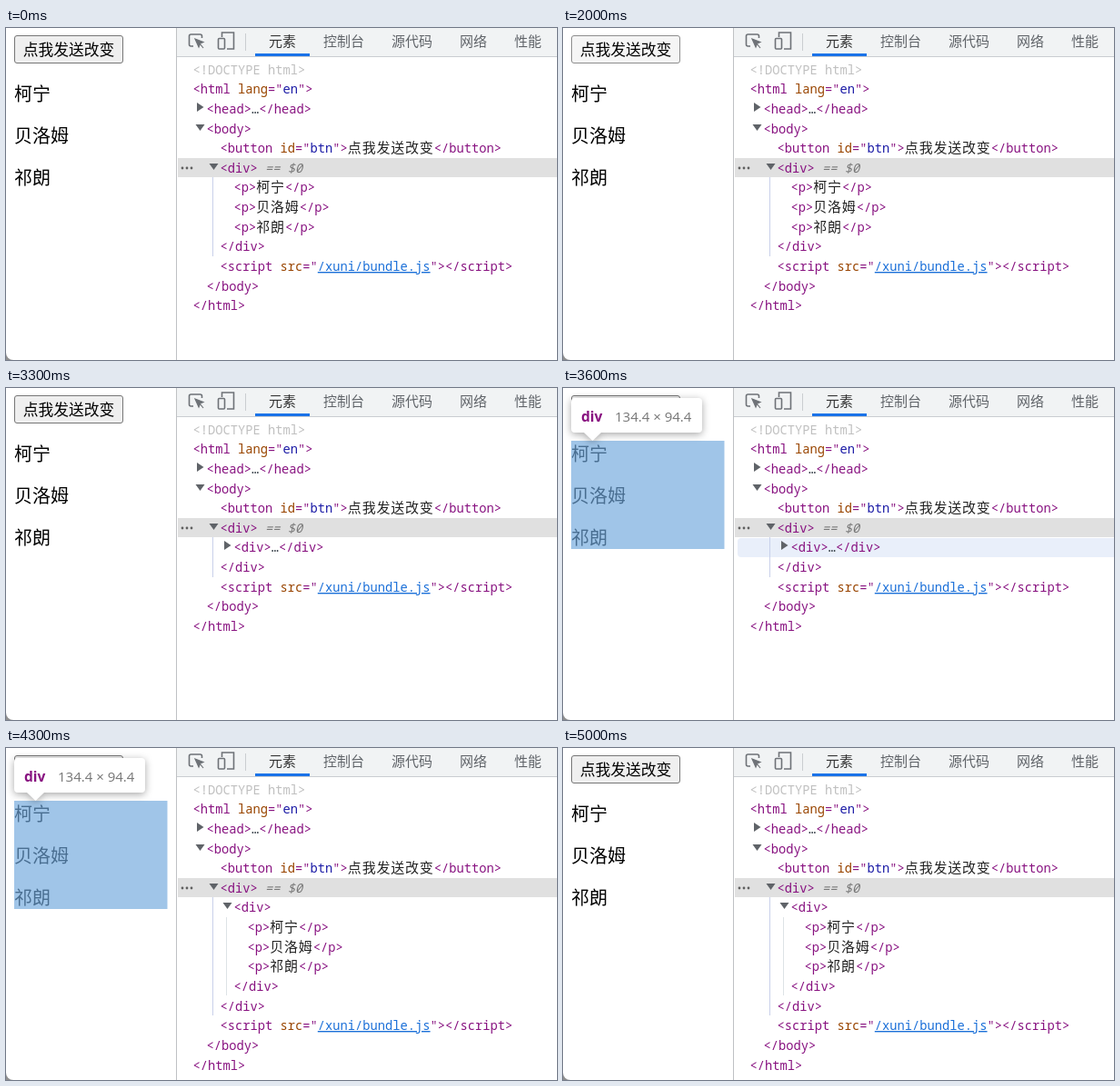
These frames come from a looping animation (606 by 365 pixels, 6300 ms). An HTML page:

```html
<!DOCTYPE html>
<html lang="zh">
<head>
<meta charset="utf-8">
<style>
html, body { margin: 0; width: 100%; height: 100%; overflow: hidden; background: #fff; }
svg { display: block; }
text { white-space: pre; font-family: "Noto Sans CJK SC", "Noto Sans CJK", sans-serif; }
.page text { font-size: 20px; font-weight: 300; }
.tabs text { font-size: 15px; font-weight: 300; fill: #5f6368; }
.tree text { font: 13.75px "Noto Sans Mono", monospace; fill: #881280; }
.tree .k { font: 300 15px "Noto Sans CJK SC", "Noto Sans CJK", sans-serif; letter-spacing: .8px; fill: #222; }
.tree .n { fill: #994500; }
.tree .v { fill: #1a1aa6; }
.tree .a { fill: #1a6fd8; text-decoration: underline; }
.tree .g { fill: #c0c0c0; }
.tree .e { fill: #303942; }
.tree .s { fill: #777; font-style: italic; }
.tree .d { fill: var(--ink); }
.flash { fill: var(--mark); }
.tip text { font: 15px "Open Sans", sans-serif; fill: #757575; }
.tip .b { font-weight: bold; font-size: 15.5px; fill: #881280; }
.box { filter: drop-shadow(0 2px 4px rgba(0, 0, 0, .35)); }
</style>
</head>
<body>
<svg id="stage" width="606" height="365" viewBox="0 0 606 365">
  <g class="page">
    <rect id="btn" x="9.5" y="8.5" width="119" height="30" rx="2.5"/>
    <text x="69" y="30" text-anchor="middle" style="font-size:16.8px">点我发送改变</text>
    <text x="9" y="80">柯宁</text>
    <text x="9" y="126">贝洛姆</text>
    <text x="9" y="172">祁朗</text>
    <path d="M0 357A8 8 0 0 0 8 365H0Z" fill="#8f8f8f"/>
  </g>
  <g id="tip" class="tip">
    <rect x="9" y="58" width="168.5" height="119" fill="rgba(111,168,220,.66)"/>
    <path class="box" fill="#fff" d="M13 11H149a4 4 0 0 1 4 4V45a4 4 0 0 1-4 4H42L32.5 58L23 49H13a4 4 0 0 1-4-4V15a4 4 0 0 1 4-4Z"/>
    <text class="b" x="20" y="37">div</text>
    <text x="57" y="37">134.4 × 94.4</text>
  </g>
  <rect x="187" width="419" height="365" fill="#fff"/>
  <g class="tabs">
    <rect x="188" width="418" height="31" fill="#f1f3f4"/>
    <path d="M188 31.5H606M263.5 6V25" stroke="#cacdd1"/>
    <path d="M187.5 0V365" stroke="#bfc1c4"/>
    <rect x="274" y="28" width="60" height="3" fill="#1a73e8"/>
    <g fill="none" stroke="#6e7277" stroke-width="1.6">
      <path d="M215.5 11V9a2 2 0 0 0-2-2H203.500a2 2 0 0 0-2 2V18a2 2 0 0 0 2 2H206"/>
      <path d="M208 12L217 15.5L213.500 17L212 21ZM213 17L217 22" fill="#6e7277" stroke-width="1.2"/>
      <path d="M237.5 10V5H250.5V23H243"/>
      <rect x="233.500" y="11.500" width="7" height="11.500" rx="1"/>
    </g>
    <text x="289" y="20" style="fill:#333">元素</text>
    <text x="349" y="20">控制台</text>
    <text x="424" y="20">源代码</text>
    <text x="499" y="20">网络</text>
    <text x="559" y="20">性能</text>
  </g>
  <path id="hover" fill="#e9effa" d="M606 0H196a4 4 0 0 0-4 4V17a4 4 0 0 0 4 4H606Z"/>
  <rect x="189" y="143" width="417" height="21" fill="#e0e0e0"/>
  <g fill="#606060"><circle cx="194" cy="154" r="1.4"/><circle cx="199" cy="154" r="1.4"/><circle cx="204" cy="154" r="1.4"/></g>
  <g id="trees" class="tree"></g>
</svg>
<script>
const $ = id => document.getElementById(id);
const LOOP = 6300;
const rowMid = i => Math.floor(46.2 + 21.63 * i);

const span = (c, s) => `<tspan class="${c}">${s}</tspan>`;
const tag = (s, attrs = '') => `&lt;${s}${attrs}&gt;`;
const attr = (n, v, c = 'v') => ` ${span('n', n)}="${span(c, v)}"`;
const dots = span('e', '…');
const selected = span('s', ' == $0');
const flashDiv = tag(span('d', 'div'));

// A row is [indent, markup, arrow]
const people = indent => ['柯宁', '贝洛姆', '祁朗'].map(s => [indent, tag('p') + span('k', s) + tag('/p')]);
const head = [
  [0, span('g', '&lt;!DOCTYPE html&gt;')],
  [0, tag('html', attr('lang', 'en'))],
  [1, tag('head') + dots + tag('/head'), 'shut'],
  [1, tag('body'), 'open'],
  [2, tag('button', attr('id', 'btn')) + span('k', '点我发送改变') + tag('/button')]
];
const tail = [
  [2, tag('/div')],
  [2, tag('script', attr('src', '/xuni/bundle.js', 'a')) + tag('/script')],
  [1, tag('/body')],
  [0, tag('/html')]
];

const arrows = { shut: 'M-10.5 -7L-3 -2L-10.5 3Z', open: 'M-12 -5H-2L-7 2Z' };
const guide = (x, from, to, color) => `<path d="M${x} ${from}V${to}" stroke="${color}"/>`;
const flash = (x, y) => `<rect class="flash" x="${x}" y="${y}" width="25" height="17" rx="2"/>`;

function tree(middle, under) {
  const rows = [...head, ...middle, ...tail].map(([indent, markup, arrow], i) => {
    const x = 205.5 + 15 * indent, y = rowMid(i);
    const mark = arrow ? `<path d="${arrows[arrow]}" transform="translate(${x} ${y})" fill="#5f6368"/>` : '';
    return `${mark}<text x="${x}" y="${y + 5}">${markup}</text>`;
  });
  return `<g>${under}${rows.join('')}</g>`;
}

const line = '#c8d0ea';
$('trees').innerHTML =
  tree([[2, tag('div') + selected, 'open'], ...people(3)], guide(227.5, 164, 251, line)) +
  tree([[2, flashDiv + selected, 'open'], [3, flashDiv + dots + tag('/div'), 'shut']],
    guide(227.5, 164, 208, line) + flash(244, 146) + flash(259, 168)) +
  tree([[2, tag('div') + selected, 'open'], [3, tag('div'), 'open'], ...people(4), [3, tag('/div')]],
    guide(227.5, 164, 294, line) + guide(242.5, 186, 272, '#dde3e6'));
const trees = [...$('trees').children];

const show = (el, on) => { el.style.display = on ? '' : 'none'; };
const mix = (a, b, k) => a.map((v, i) => Math.round(v + (b[i] - v) * k));
// Value of the last [time, value] entry already reached
const at = (steps, t) => steps.filter(s => s[0] <= t).pop()[1];

const rest = ['#efefef', '#767676'], over = ['#e5e5e5', '#4f4f4f'], down = ['#f5f5f5', '#8d8d8d'];
const button = [[0, rest], [1100, over], [2000, down], [2100, over], [2900, rest]];
const treeAt = [[0, 0], [2100, 1], [4200, 2]];
const hoverRow = [[0, -1], [3500, 0], [3600, 6], [3700, 7], [3900, 6], [4300, -1], [4900, 10], [5000, -1]];
const purple = [136, 18, 128], mauve = [168, 148, 166], white = [255, 255, 255];

function draw(now) {
  const t = Math.floor(now % LOOP / 100) * 100;
  const [fill, edge] = at(button, t);
  $('btn').setAttribute('fill', fill);
  $('btn').setAttribute('stroke', edge);

  const current = at(treeAt, t);
  trees.forEach((g, i) => show(g, i === current));

  // The changed tags flash, ease out, then fade
  const x = Math.min(1, Math.max(0, (t - 2090) / 1120));
  const k = 1 - (1 - x) ** 2.9;
  const alpha = t < 3200 ? 1 : t < 3300 ? .4 : 0;
  $('stage').style.setProperty('--mark', `rgba(${mix(purple, mauve, k)},${alpha})`);
  $('stage').style.setProperty('--ink', `rgb(${mix(white, purple, k)})`);

  const row = at(hoverRow, t);
  show($('hover'), row >= 0);
  $('hover').setAttribute('transform', `translate(0 ${rowMid(row) - 10})`);
  show($('tip'), t >= 3600 && t < 5000);
}

const start = performance.now();
function loop() {
  draw(performance.now() - start);
  requestAnimationFrame(loop);
}
loop();
</script>
</body>
</html>
```
